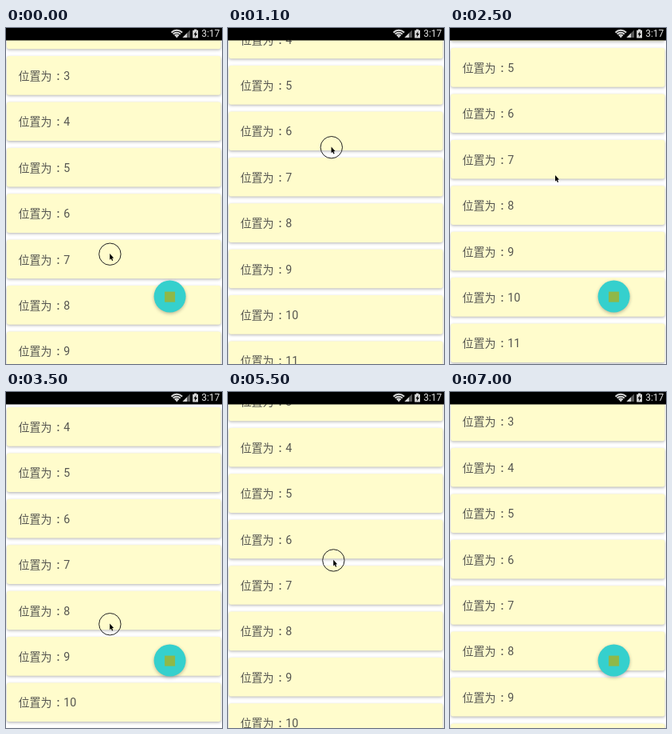
An HTML page with a canvas for the animation above (7.1 s loop, 271 by 420 pixels).

```html
<!DOCTYPE html>
<html lang="zh-CN">
<head>
<meta charset="utf-8">
<title>List with floating button</title>
<style>
html, body { margin: 0; width: 100%; height: 100%; overflow: hidden; background: #fff; }
canvas { display: block; width: 271px; height: 420px; }
</style>
</head>
<body>
<canvas id="stage"></canvas>
<script>
const W = 271, H = 420, LOOP = 7100, STEP = 100;
const PITCH = 57.4, CARD_H = 48.6, BAR_H = 15.5;
const FAB_MS = 200, EXIT = 6900;

const canvas = document.getElementById('stage');
const dpr = window.devicePixelRatio || 1;
canvas.width = Math.round(W * dpr);
canvas.height = Math.round(H * dpr);
const ctx = canvas.getContext('2d');

// [time, centre of row 3, pointer x, pointer y]
const moves = [
  [0, 60, 130.2, 282.5],
  [1100, -42.8, 129.6, 149],
  [1800, -106, 130, 110],
  [2500, -64.8, 132, 184.5],
  [2800, -64.8, 130, 230],
  [3500, -13.4, 130.2, 290],
  [4000, 72, 130, 372],
  [5000, 72, 131, 246.5],
  [6275, -79.8, 134, 154],
  [LOOP, 53.7, 134, 220]
];

// The finger is down while the list moves; the button hides when rows
// move up and comes back when they move down.
function stateAt(t) {
  let shown = true, since = -LOOP, i = 0;
  for (; i < moves.length - 1 && moves[i][0] <= t; i++) {
    const dy = moves[i + 1][1] - moves[i][1];
    if (dy && shown !== dy > 0) {
      shown = dy > 0;
      since = moves[i][0];
    }
  }
  const a = moves[i - 1], b = moves[i];
  const p = (t - a[0]) / (b[0] - a[0]);
  const [, row, x, y] = a.map((v, k) => v + (b[k] - v) * p);
  const q = Math.min(1, (t - since) / FAB_MS);
  return { row, x, y, pressed: a[1] !== b[1], fab: shown ? 1 - (1 - q) ** 2.4 : 1 - q * q };
}

function shadow(color, blur, y) {
  ctx.shadowColor = color;
  ctx.shadowBlur = blur * dpr;
  ctx.shadowOffsetY = y * dpr;
}

function poly(points, color) {
  ctx.fillStyle = color;
  ctx.beginPath();
  points.forEach(([x, y]) => ctx.lineTo(x, y));
  ctx.closePath();
  ctx.fill();
}

function circle(x, y, r) {
  ctx.beginPath();
  ctx.arc(x, y, r, 0, Math.PI * 2);
}

function text(str, x, y, font, color, align = 'left') {
  ctx.font = font;
  ctx.fillStyle = color;
  ctx.textAlign = align;
  ctx.fillText(str, x, y);
}

function drawRow(n, y) {
  ctx.save();
  shadow('rgba(0,0,0,.28)', 3.5, 1.3);
  ctx.fillStyle = '#fffccc';
  ctx.beginPath();
  ctx.roundRect(1, y - 0.6 - CARD_H / 2, 268.5, CARD_H, 3);
  ctx.fill();
  ctx.restore();
  const ink = '#555550', base = y + 4.9;
  text('位置为', 15.5, base, '14px "Noto Sans CJK SC", "Noto Sans CJK", sans-serif', ink);
  text(':', 65.6, base, '500 15px Roboto, sans-serif', ink, 'center');
  text(n, 72.2, base, '14.25px Roboto, sans-serif', ink);
}

function drawFab(scale) {
  if (scale <= 0) return;
  ctx.save();
  ctx.globalAlpha = scale;
  ctx.translate(205.6, 335.6);
  ctx.scale(scale, scale);
  ctx.save();
  if (scale === 1) shadow('rgba(0,0,0,.28)', 4, 1.5);
  ctx.fillStyle = '#35d0cd';
  circle(0, 0, 20);
  ctx.fill();
  ctx.restore();
  ctx.fillStyle = '#8fb848';
  ctx.fillRect(-6.5, -6, 13, 13);
  ctx.restore();
}

function drawStatusBar() {
  const light = '#d8d8d8';
  ctx.fillStyle = '#000';
  ctx.fillRect(0, 0, W, BAR_H);
  ctx.strokeStyle = light;
  ctx.lineWidth = 2;
  for (let r = 3.4; r < 10; r += 2.9) {
    ctx.beginPath();
    ctx.arc(214.3, 12, r, -Math.PI * 0.76, -Math.PI * 0.24);
    ctx.stroke();
  }
  poly([[214.3, 12.4], [212, 9.6], [216.6, 9.6]], light);
  poly([[231, 2.5], [231, 12], [221.5, 12]], '#5a5a5a');
  poly([[227, 6.5], [227, 12], [221.5, 12]], light);
  ctx.fillStyle = light;
  ctx.fillRect(236, 1.6, 3.2, 2);
  ctx.fillRect(234.2, 2.8, 6.8, 9.7);
  poly([[238.6, 4], [235.5, 8.2], [237.3, 8.2], [236.8, 11.4], [240, 7], [238.1, 7]], '#000');
  text('3:17', 268.3, 11.4, '12px Roboto, sans-serif', '#dedede', 'right');
}

function drawPointer({ x, y, pressed }) {
  if (pressed) {
    ctx.strokeStyle = '#222';
    ctx.lineWidth = 1;
    circle(x + 0.2, y + 0.2, 13.7);
    ctx.stroke();
  }
  ctx.save();
  ctx.translate(x, y - 0.4);
  ctx.scale(0.9, 0.95);
  poly([[0, 0], [0, 8], [1.8, 6.5], [3.2, 9.4], [4.5, 8.8], [3.2, 6], [5.5, 5.8]], '#000');
  ctx.restore();
}

function draw(t) {
  const state = stateAt(t);
  ctx.setTransform(dpr, 0, 0, dpr, 0, 0);
  ctx.fillStyle = '#fff';
  ctx.fillRect(0, 0, W, H);
  const origin = state.row - 3 * PITCH;
  const first = Math.max(0, Math.floor((BAR_H - 30 - origin) / PITCH));
  for (let n = first; origin + n * PITCH < H + 30; n++) drawRow(n, origin + n * PITCH);
  drawFab(state.fab);
  drawStatusBar();
  if (t < EXIT) drawPointer(state);
}

const began = performance.now();
function tick() {
  const t = (performance.now() - began) % LOOP;
  draw(Math.floor(t / STEP) * STEP);
  requestAnimationFrame(tick);
}
tick();
</script>
</body>
</html>
```
